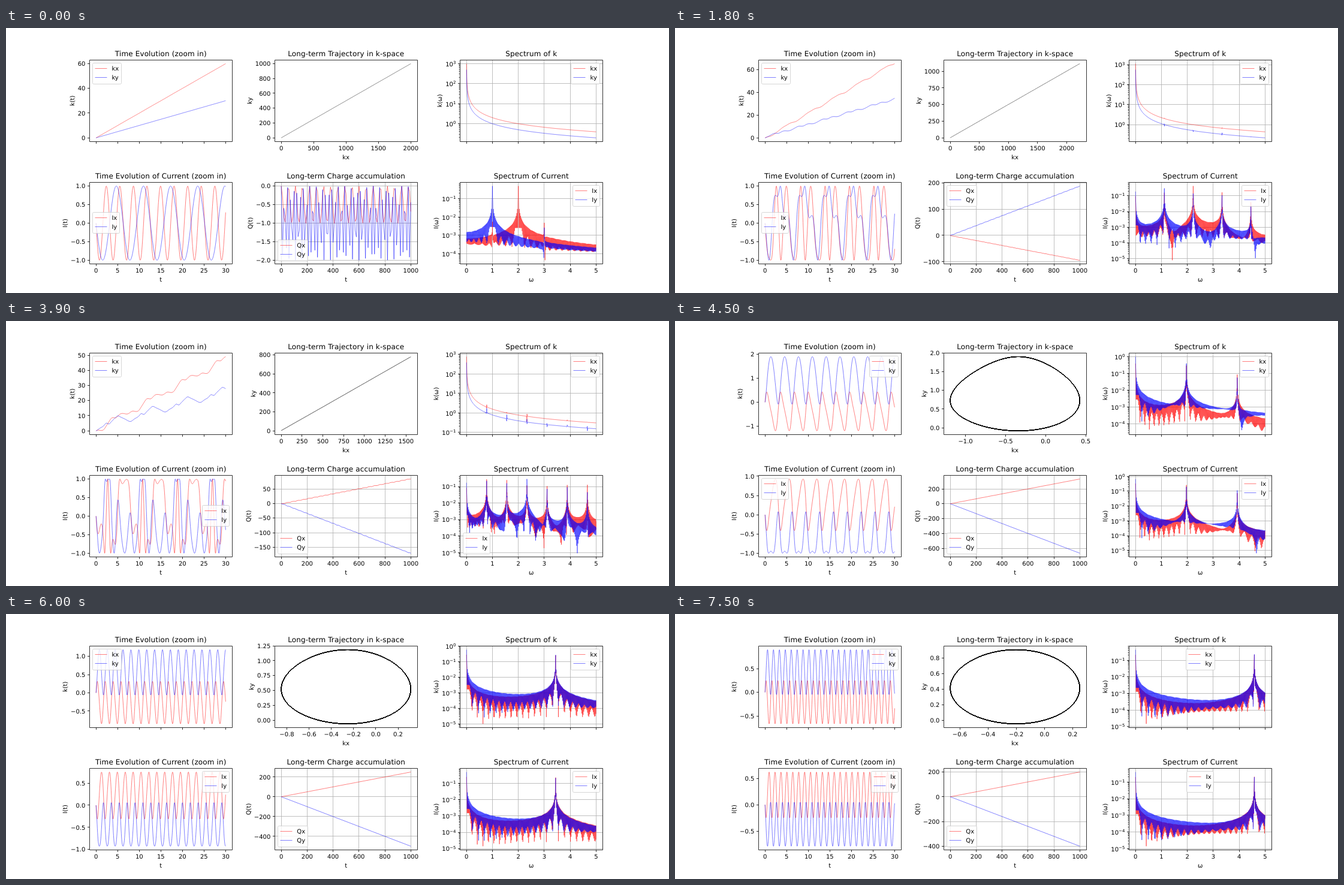
An HTML page for the animation above (7800 ms loop, 1106 by 442 pixels).

```html
<!DOCTYPE html>
<html lang="en">
<head>
<meta charset="utf-8">
<title>Motion in crossed fields</title>
<style>
  html, body { margin: 0; width: 100%; height: 100%; overflow: hidden; background: #fff; }
  svg { display: block; width: 100vw; height: 100vh; }
  text { font: 10px "DejaVu Sans", Verdana, sans-serif; fill: #000; text-rendering: geometricPrecision; white-space: pre; }
  .title { font-size: 12px; letter-spacing: .13px; }
  .sup { font-size: 7px; }
  .mid { text-anchor: middle; }
  .end { text-anchor: end; }
  path, rect { fill: none; }
  .grid { stroke: #b0b0b0; stroke-width: .8; }
  .axis { stroke: #000; stroke-width: .8; }
  .minor { stroke: #000; stroke-width: .6; }
  .curve { stroke-width: .5; stroke-linejoin: round; }
  .box { fill: #fff; stroke: #ccc; opacity: .8; }
</style>
</head>
<body>
<svg id="stage" viewBox="0 0 1106 442" xmlns="http://www.w3.org/2000/svg"></svg>
<script>
const STEP_MS = 300, FRAMES = 26;
const N = 40000, DT = 0.025, STRIDE = 4;
const LEFT = [139.4, 448.3, 757.4], TOP = [53.3, 257.4], W = 237.8, H = 136.1;
const BOX_H = 35;
const stage = document.getElementById('stage');
const range = (n, f) => Array.from({ length: n }, (_, i) => f(i));
const snap = v => Math.floor(v) + 0.5;

// Lattice electron in field (2, 1) with magnetic field B, integrated by RK4.
function simulate(B) {
  const [kx, ky, ix, iy, qx, qy] = range(6, () => new Float64Array(N + 1));
  const fx = y => 2 - B * Math.sin(y), fy = x => 1 + B * Math.sin(x);
  const h = DT;
  let x = 0, y = 0;
  for (let n = 1; n <= N; n++) {
    const a1 = fx(y), b1 = fy(x);
    const a2 = fx(y + b1 * h / 2), b2 = fy(x + a1 * h / 2);
    const a3 = fx(y + b2 * h / 2), b3 = fy(x + a2 * h / 2);
    const a4 = fx(y + b3 * h), b4 = fy(x + a3 * h);
    x += h * (a1 + 2 * a2 + 2 * a3 + a4) / 6;
    y += h * (b1 + 2 * b2 + 2 * b3 + b4) / 6;
    kx[n] = x;
    ky[n] = y;
    ix[n] = -Math.sin(x);
    iy[n] = -Math.sin(y);
    qx[n] = qx[n - 1] + h * (ix[n] + ix[n - 1]) / 2;
    qy[n] = qy[n - 1] + h * (iy[n] + iy[n - 1]) / 2;
  }
  return { kx, ky, ix, iy, qx, qy };
}

// Log magnitudes of the Fourier integrals of two signals for ω = 0 … 5.
function spectra(a, b) {
  const out = [[], []], dt = DT * STRIDE, count = N / STRIDE;
  for (let j = 0; j <= 1000; j++) {
    const w = j / 200, cr = Math.cos(w * dt), sr = Math.sin(w * dt);
    let c = 1, s = 0, ar = 0, ai = 0, br = 0, bi = 0;
    for (let n = 0; n <= N; n += STRIDE) {
      const g = n === N ? 0.5 : 1, u = a[n] * g, v = b[n] * g;
      ar += u * c; ai += u * s;
      br += v * c; bi += v * s;
      const t = c * cr - s * sr;
      s = s * cr + c * sr;
      c = t;
    }
    out[0].push([w, Math.log10(Math.hypot(ar, ai) / count + 1e-12)]);
    out[1].push([w, Math.log10(Math.hypot(br, bi) / count + 1e-12)]);
  }
  return out;
}

function limits(lines, k) {
  let lo = Infinity, hi = -Infinity;
  for (const line of lines) for (const p of line) {
    lo = Math.min(lo, p[k]);
    hi = Math.max(hi, p[k]);
  }
  const pad = (hi - lo) * 0.05;
  return [lo - pad, hi + pad];
}

// Ticks may overshoot the limits by about half a pixel.
const slack = ([lo, hi]) => [lo - (hi - lo) * 0.003, hi + (hi - lo) * 0.003];

function ticks(lim, bins) {
  const raw = (lim[1] - lim[0]) / bins, unit = 10 ** Math.floor(Math.log10(raw));
  const step = [1, 2, 2.5, 5, 10].find(s => s * unit >= raw - 1e-12) * unit;
  const [lo, hi] = slack(lim);
  let digits = 0;
  while (Math.abs(step * 10 ** digits - Math.round(step * 10 ** digits)) > 1e-6) digits++;
  const list = [];
  for (let i = Math.ceil(lo / step); i * step <= hi; i++) {
    list.push({ v: i * step, label: (i * step).toFixed(digits).replace('-', '\u2212') });
  }
  return list;
}

function decades(lim) {
  const [lo, hi] = slack(lim), list = [];
  for (let e = Math.ceil(lo); e <= hi; e++) {
    list.push({ v: e, sup: String(e).replace('-', '\u2212') });
  }
  return list;
}

const glyph = { '.': 0.318, '\u2212': 0.838, k: 0.579, x: 0.592, y: 0.592, I: 0.295, Q: 0.787 };
const textWidth = (s, size = 10) =>
  [...s].reduce((sum, ch) => sum + (glyph[ch] || 0.636) * size, 0);
const tickWidth = t => t.sup ? 12.7 + textWidth(t.sup, 7) : textWidth(t.label);

const stroke = (d, color) => `<path class="curve" stroke="${color}" d="${d}"/>`;

// Dense curves are dealt out over layers, so that crowded strokes add up to full colour.
function curve(points, color, layers = 1) {
  const kept = [];
  let px, py;
  points.forEach(([x, y], i) => {
    if (i && i < points.length - 1 && Math.abs(x - px) + Math.abs(y - py) < 0.4) return;
    kept.push(x.toFixed(2) + ' ' + y.toFixed(2));
    px = x;
    py = y;
  });
  if (layers === 1) return stroke('M' + kept.join('L'), color);
  const parts = range(layers, () => '');
  for (let i = 1; i < kept.length; i++) parts[i % layers] += `M${kept[i - 1]}L${kept[i]}`;
  return parts.map(d => stroke(d, color)).join('');
}

function crosses([x0, y0], [x1, y1], b) {
  let t0 = 0, t1 = 1;
  const dx = x1 - x0, dy = y1 - y0;
  for (const [p, q] of [[-dx, x0 - b.x], [dx, b.x + b.w - x0], [-dy, y0 - b.y], [dy, b.y + b.h - y0]]) {
    if (p === 0) {
      if (q < 0) return false;
    } else if (p < 0) t0 = Math.max(t0, q / p);
    else t1 = Math.min(t1, q / p);
  }
  return t0 <= t1;
}

// Place the legend where it hides the fewest points.
function legendBox(lines, left, top, w, h) {
  const xs = [left + 5, left + (W - w) / 2, left + W - w - 5];
  const ys = [top + 5, top + (H - h) / 2, top + H - h - 5];
  const spots = [[2, 0], [0, 0], [0, 2], [2, 2], [2, 1], [0, 1], [1, 2], [1, 0], [1, 1]];
  let best, least = Infinity;
  for (const [i, j] of spots) {
    const b = { x: xs[i], y: ys[j], w, h };
    let bad = 0;
    for (const line of lines) {
      for (const [x, y] of line) {
        if (x > b.x && x < b.x + w && y > b.y && y < b.y + h) bad++;
      }
      if (line.some((p, n) => n && crosses(line[n - 1], p, b))) bad++;
    }
    if (bad < least) {
      least = bad;
      best = b;
    }
  }
  return best;
}

function legend(names, colors, lines, left, top) {
  const w = 36 + textWidth(names[0]);
  const b = legendBox(lines, left, top, w, BOX_H);
  const x = snap(b.x), y = snap(b.y);
  let s = `<rect class="box" x="${x}" y="${y}" width="${Math.round(w)}" height="${BOX_H}" rx="2"/>`;
  names.forEach((name, i) => {
    const ly = y + 9 + 15 * i;
    s += stroke(`M${x + 4} ${ly}h20`, colors[i]);
    s += `<text x="${b.x + 32}" y="${ly + 3.5}">${name}</text>`;
  });
  return s;
}

function panel(o) {
  const left = LEFT[o.col], top = TOP[o.row], bottom = top + H;
  const xl = limits(o.lines, 0), yl = limits(o.lines, 1);
  const sx = v => left + (v - xl[0]) / (xl[1] - xl[0]) * W;
  const sy = v => bottom - (v - yl[0]) / (yl[1] - yl[0]) * H;
  const xt = ticks(xl, 7), yt = o.log ? decades(yl) : ticks(yl, 6);
  const x0 = snap(left), x1 = snap(left + W), y0 = snap(top), y1 = snap(bottom);
  const colors = o.names ? ['red', 'blue'] : ['black'];
  let grid = '', marks = '', minor = '', text = '';

  for (const t of xt) {
    const x = snap(sx(t.v));
    grid += `M${x} ${y0}V${y1}`;
    marks += `M${x} ${y1}v3.5`;
    if (o.xlabel) text += `<text class="mid" x="${sx(t.v)}" y="${bottom + 14.8}">${t.label}</text>`;
  }
  for (const t of yt) {
    const y = sy(t.v);
    grid += `M${x0} ${snap(y)}H${x1}`;
    marks += `M${x0} ${snap(y)}h-3.5`;
    text += t.sup
      ? `<text class="end" x="${left - 7}" y="${y + 4.3}">10<tspan class="sup" dy="-3.8">${t.sup}</tspan></text>`
      : `<text class="end" x="${left - 7}" y="${y + 3.7}">${t.label}</text>`;
  }
  if (o.log) {
    for (let e = Math.floor(yl[0]); e <= yl[1]; e++) for (let m = 2; m < 10; m++) {
      const v = e + Math.log10(m);
      if (v > yl[0] && v < yl[1]) minor += `M${x0} ${snap(sy(v))}h-2`;
    }
  }

  const lines = o.lines.map(line => line.map(([x, y]) => [sx(x), sy(y)]));
  const lx = left - 13 - Math.max(...yt.map(tickWidth)), ly = top + H / 2;
  const cx = left + W / 2;
  return (o.grid ? `<path class="grid" d="${grid}"/>` : '')
    + lines.map((line, i) => curve(line, colors[i], o.layers)).join('')
    + `<path class="axis" d="${marks}M${x0} ${y0}H${x1}V${y1}H${x0}Z"/>`
    + `<path class="minor" d="${minor}"/>` + text
    + `<text class="title mid" x="${cx}" y="${top - 6}">${o.title}</text>`
    + (o.xlabel ? `<text class="mid" x="${cx}" y="${bottom + 29.2}">${o.xlabel}</text>` : '')
    + `<text class="mid" transform="translate(${lx} ${ly}) rotate(-90)">${o.ylabel}</text>`
    + (o.names ? legend(o.names, colors, lines, left, top) : '');
}

function build(i) {
  const B = Math.max(0.02, 0.2 * i), r = simulate(B);
  const sample = (a, until, dt) => range(until / dt + 1, n => [n * dt, a[Math.round(n * dt / DT)]]);
  const zoom = a => sample(a, 30, 0.05), long = a => sample(a, 1000, 10);
  const closed = Math.abs(r.kx[N]) < 20;
  const orbit = range(closed ? 4001 : N + 1, n => [r.kx[n], r.ky[n]]);
  return panel({
    col: 0, row: 0, title: 'Time Evolution (zoom in)', ylabel: 'k(t)', names: ['kx', 'ky'],
    lines: [zoom(r.kx), zoom(r.ky)]
  }) + panel({
    col: 1, row: 0, title: 'Long-term Trajectory in k-space', xlabel: 'kx', ylabel: 'ky',
    lines: [orbit], layers: 4
  }) + panel({
    col: 2, row: 0, title: 'Spectrum of k', ylabel: 'k(ω)', names: ['kx', 'ky'],
    lines: spectra(r.kx, r.ky), log: true, grid: true, layers: 4
  }) + panel({
    col: 0, row: 1, title: 'Time Evolution of Current (zoom in)', xlabel: 't', ylabel: 'I(t)',
    names: ['Ix', 'Iy'], lines: [zoom(r.ix), zoom(r.iy)]
  }) + panel({
    col: 1, row: 1, title: 'Long-term Charge accumulation', xlabel: 't', ylabel: 'Q(t)',
    names: ['Qx', 'Qy'], lines: [long(r.qx), long(r.qy)], grid: true
  }) + panel({
    col: 2, row: 1, title: 'Spectrum of Current', xlabel: 'ω', ylabel: 'I(ω)',
    names: ['Ix', 'Iy'], lines: spectra(r.ix, r.iy), log: true, grid: true, layers: 4
  });
}

const cache = [];
const picture = i => cache[i] || (cache[i] = build(i));
let shown = -1;

function draw(ms) {
  const i = Math.floor(ms / STEP_MS) % FRAMES;
  if (i === shown) return;
  shown = i;
  stage.innerHTML = picture(i);
  setTimeout(() => picture((i + 1) % FRAMES), 0);
}

draw(0);
const start = performance.now();
(function tick() {
  draw(Math.max(0, performance.now() - start));
  requestAnimationFrame(tick);
})();
</script>
</body>
</html>
```
